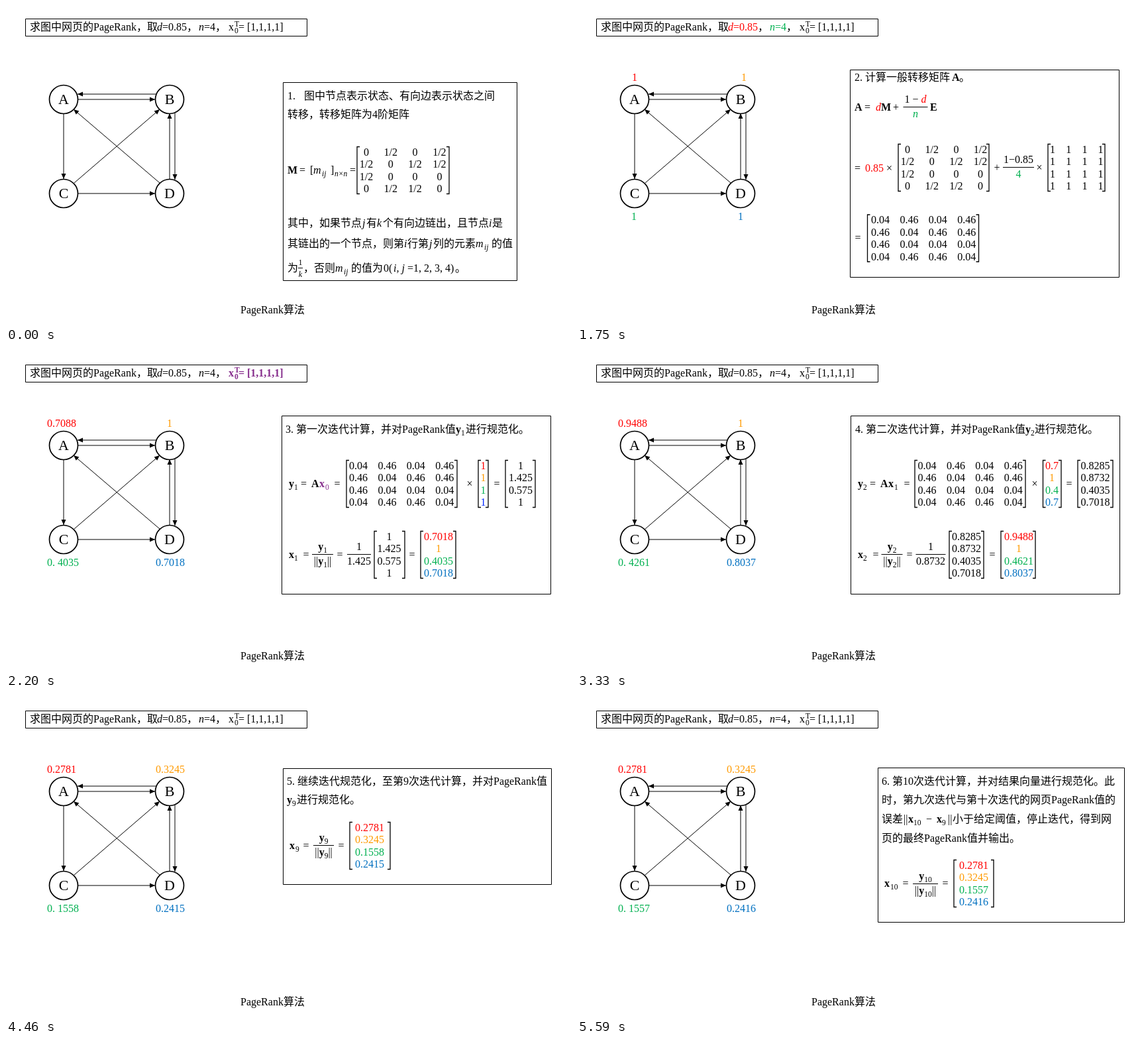
An HTML page that plays this animation: 853 by 480 pixels, repeating every 6.72 s.

```html
<!DOCTYPE html>
<html lang="zh-CN">
<head>
<meta charset="utf-8">
<title>PageRank算法</title>
<style>
html, body { margin: 0; width: 100%; height: 100%; overflow: hidden; background: #fff; }
svg { display: block; width: 853px; height: 480px; }
text { font: 16px 'Liberation Serif', 'Noto Sans CJK SC', 'Noto Sans CJK', serif; white-space: pre; }
.mid { text-anchor: middle; }
.node { font-size: 22px; text-anchor: middle; }
.line { fill: none; stroke: #000; }
</style>
</head>
<body>
<svg id="stage" viewBox="0 0 853 480"></svg>
<script>
const COLORS = { R: '#f00', O: '#ff9a00', G: '#00b050', B: '#0070c0', V: '#0026ff', P: '#862d8c' };
const STARTS = [0, 1070, 2200, 3330, 4460, 5590];
const LOOP = 6720;

// Markup: {x flags|text}; i italic, w bold, s subscript, u superscript, capitals are colours.
function spans(src) {
  let out = '', shift = 0;
  for (const [, x, flags = '', marked, plain] of src.matchAll(/\{(\d*)([a-zA-Z]*)\|([^}]*)\}|([^{]+)/g)) {
    const goal = flags.includes('s') ? 4 : flags.includes('u') ? -6 : 0;
    let attr = x ? ` x="${x}"` : '';
    if (goal !== shift) attr += ` dy="${goal - shift}"`;
    shift = goal;
    if (goal) attr += ' font-size="11.5"';
    for (const f of flags) {
      if (f === 'i') attr += ' font-style="italic"';
      if (f === 'w') attr += ' font-weight="bold"';
      if (COLORS[f]) attr += ` fill="${COLORS[f]}"`;
    }
    out += `<tspan${attr}>${marked ?? plain}</tspan>`;
  }
  return out;
}
const text = (x, y, src, cls = '') => `<text x="${x}" y="${y}" class="${cls}">${spans(src)}</text>`;
const mid = (x, y, src) => text(x, y, src, 'mid');
const path = (d, w = 1) => `<path class="line" d="${d}" stroke-width="${w}"/>`;
const box = (x, y, x2, y2) => path(`M${x + .5} ${y + .5}H${x2 + .5}V${y2 + .5}H${x + .5}Z`);
const ops = (y, list) => list.map(([x, ch]) => mid(x, y + 5, ch)).join('');
const frac = (x, y, w, num, den) =>
  path(`M${x - w / 2} ${y + .5}h${w}`) + mid(x, y - 6, num) + mid(x, y + 16, den);

function matrix(x1, x2, cy, cols, body) {
  const rows = body.split(';').map((row, r) => row.split(' ').map((cell, c) =>
    mid(cols[c], cy + 5.5 + (r - 1.5) * 18.6, cell)).join('')).join('');
  const top = cy - 35.5, bottom = cy + 35.5;
  return rows + path(`M${x1 + 4} ${top}H${x1}V${bottom}h4M${x2 - 4} ${top}H${x2}V${bottom}h-4`, 1.3);
}

function arrow(x1, y1, x2, y2) {
  const deg = Math.atan2(y2 - y1, x2 - x1) * 180 / Math.PI;
  return path(`M${x1} ${y1}L${x2} ${y2}`) +
    `<path d="M0 0L-8 -3.5V3.5Z" transform="translate(${x2} ${y2}) rotate(${deg})"/>`;
}

function header(d, n, v, digits) {
  const list = [...digits].map(c => `{${v}${c}|1}`).join(`{${v}|,}`);
  return text(36, 37, `求图中网页的PageRank，取{228i${d}|d}{${d}|=0.85}，{291i${n}|n}{${n}|=4}，` +
    `{336${v}|x}{345s${v}|0}{345u${v}|T}{351${v}|=}{364${v}|[}${list}{${v}|]}`);
}
const plainHeader = header('', '', '', '----'.replace(/-/g, 'k'));

const labels = (a, b, c, d, xs = [62, 226, 62, 226]) =>
  [a, b, c, d].map((s, i) => text(xs[i], i < 2 ? 113 : 323, `{${'ROGB'[i]}|${s}}`)).join('');

const nodes = [['A', 87, 141], ['B', 247, 141], ['C', 87, 283], ['D', 247, 283]];
const edges = [
  [227, 133, 108, 133], [109, 141, 225, 141], [87, 163, 87, 261], [255, 161, 255, 262],
  [247, 261, 247, 162], [109, 283, 225, 283], [103, 267, 232, 156], [232, 267, 102, 156]
];
const base = box(29, 19, 454, 45) + edges.map(e => arrow(...e)).join('') +
  nodes.map(([s, x, y]) => `<circle class="line" cx="${x}" cy="${y}" r="21.5" stroke-width="1.7"/>` +
    text(x, y + 7, s, 'node')).join('') + text(354, 464, 'PageRank算法');

const M = '0 1/2 0 1/2;1/2 0 1/2 1/2;1/2 0 0 0;0 1/2 1/2 0';
const A = '0.04 0.46 0.04 0.46;0.46 0.04 0.46 0.46;0.46 0.04 0.04 0.04;0.04 0.46 0.46 0.04';
const E = Array(4).fill('1 1 1 1').join(';');
const tint = (src, keys = 'ROGB') => src.split(' ').map((s, i) => `{${keys[i]}|${s}}`).join(';');
const spread = (x, step) => [0, 1, 2, 3].map(i => x + i * step);
const norm = n => [`{w|y}{s|${n}}`, `||{w|y}{s|${n}}||`];

const scenes = [
  plainHeader + box(418, 115, 771, 414) +
    text(425, 141, '1.{450|图中节点表示状态、有向边表示状态之间}') +
    text(425, 169, '转移，转移矩阵为4阶矩阵') +
    text(425, 253, '{w|M}{443|=}{459|[}{464i|m}{477is|ij}{490|]}{496is|n×n}{519|=}') +
    matrix(530, 669, 248, spread(544, 36.8), M) +
    text(425, 333, '其中，如果节点{538i|j}{544|有}{560i|k}{569|个有向边链出，且节点}{729i|i}{734|是}') +
    text(425, 364, '其链出的一个节点，则第{601i|i}{606|行第}{639i|j}{645|列的元素}{709i|m}{722is|ij}{733|的值}') +
    text(425, 401, '为{449|，否则}{497i|m}{510is|ij}{521|的值为}{570|0(}{585i|i, j }=1, 2, 3, 4){678|。}') +
    path('M441 395.5h7') +
    '<g style="font-size:12px">' +
    '<text class="mid" x="444.5" y="391" style="font-size:12px">1</text>' +
    '<text class="mid" x="444.5" y="409" style="font-size:12px;font-style:italic">k</text></g>',

  header('R', 'G', '', 'kkkk') + labels(1, 1, 1, 1, [83, 248, 82, 243]) + box(412, 96, 818, 409) +
    text(419, 113, '2. 计算一般转移矩阵{566w|A}{577|。}') +
    text(419, 158, '{w|A}{434|=}{451iR|d}{459w|M}{477|+}{533w|E}') +
    frac(511, 152, 37, '1 − {iR|d}', '{iG|n}') +
    text(419, 250, '={435R|0.85}{467|×}') +
    matrix(485, 622, 244, spread(499, 36.7), M) +
    ops(244, [[634, '+'], [698, '×']]) + frac(666.5, 243, 47, '1−0.85', '{G|4}') +
    matrix(711, 797, 244, spread(718, 24.2), E) +
    ops(350, [[424, '=']]) + matrix(438.5, 606.5, 350.5, spread(458, 43.4), A),

  header('', '', 'Pw', 'ROGV') + labels('0.7088', 1, '0. 4035', '0.7018', [62, 243, 62, 226]) +
    box(416, 96, 822, 365) +
    text(422, 122, '3. 第一次迭代计算，并对PageRank值{679w|y}{687s|1}{694|进行规范化。}') +
    text(427, 204, '{w|y}{435s|1}{445|=}{461w|A}{473wP|x}{482sP|0}') +
    matrix(514, 681, 199, spread(532, 43.4), A) +
    ops(199, [[500, '='], [700, '×'], [741, '=']]) +
    matrix(713, 728, 199, [720.5], tint('1 1 1 1', 'ROGV')) +
    matrix(754, 799, 199, [777], '1;1.425;0.575;1') +
    text(427, 311, '{w|x}{435s|1}') + ops(306, [[453, '='], [504, '='], [613, '=']]) +
    frac(478, 305, 32, ...norm(1)) + frac(533, 305, 36, '1', '1.425') +
    matrix(556, 602, 306, [578.5], '1;1.425;0.575;1') +
    matrix(626, 679, 306, [653], tint('0.7018 1 0.4035 0.7018')),

  plainHeader + labels('0.9488', 1, '0. 4261', '0.8037', [62, 243, 62, 226]) +
    box(413, 96, 819, 365) +
    text(420, 122, '4. 第二次迭代计算，并对PageRank值{677w|y}{685s|2}{691|进行规范化。}') +
    text(424, 204, '{w|y}{432s|2}{442|=}{458w|A}{470w|x}{479s|1}') +
    matrix(510, 677, 199, spread(528.5, 43.4), A) +
    ops(199, [[498, '='], [691, '×'], [743, '=']]) +
    matrix(703.5, 731, 199, [717], tint('0.7 1 0.4 0.7')) +
    matrix(756, 809, 199, [782.5], '0.8285;0.8732;0.4035;0.7018') +
    text(424, 311, '{w|x}{432s|2}') + ops(306, [[451, '='], [502, '='], [627, '=']]) +
    frac(475.5, 305, 32, ...norm(2)) + frac(534, 305, 45, '1', '0.8732') +
    matrix(562, 614, 306, [588], '0.8285;0.8732;0.4035;0.7018') +
    matrix(640, 692, 306, [667], tint('0.9488 1 0.4621 0.8037')),

  plainHeader + labels('0.2781', '0.3245', '0. 1558', '0.2415') + box(418, 106, 823, 281) +
    text(424, 131, '5. 继续迭代规范化，至第9次迭代计算，并对PageRank值') +
    text(424, 159, '{w|y}{432s|9}{439|进行规范化。}') +
    text(428, 228, '{w|x}{437s|9}') + ops(223, [[453, '='], [506, '=']]) +
    frac(479.5, 222, 31, ...norm(9)) +
    matrix(519, 580, 223, [549], tint('0.2781 0.3245 0.1558 0.2415')),

  plainHeader + labels('0.2781', '0.3245', '0. 1557', '0.2416') + box(454, 105, 826, 338) +
    text(460, 131, '6. 第10次迭代计算，并对结果向量进行规范化。此') +
    text(460, 159, '时，第九次迭代与第十次迭代的网页PageRank值的') +
    text(460, 188, '误差{493||}|{500w|x}{508s|10}{527|−}{543w|x}{551s|9}{560|||}{567|小于给定阈值，停止迭代，得到网}') +
    text(460, 217, '页的最终PageRank值并输出。') +
    text(464, 285, '{w|x}{473s|10}') + ops(280, [[496, '='], [556, '=']]) +
    frac(526, 280, 38, ...norm(10)) +
    matrix(569, 629, 280, [599], tint('0.2781 0.3245 0.1557 0.2416'))
];

const stage = document.getElementById('stage');
stage.innerHTML = base + scenes.map(s => `<g>${s}</g>`).join('');
const groups = [...stage.children].slice(-scenes.length);

function draw() {
  const t = performance.now() % LOOP;
  const now = STARTS.filter(s => s <= t).length - 1;
  groups.forEach((g, i) => g.style.display = i === now ? '' : 'none');
  requestAnimationFrame(draw);
}
draw();
</script>
</body>
</html>
```
